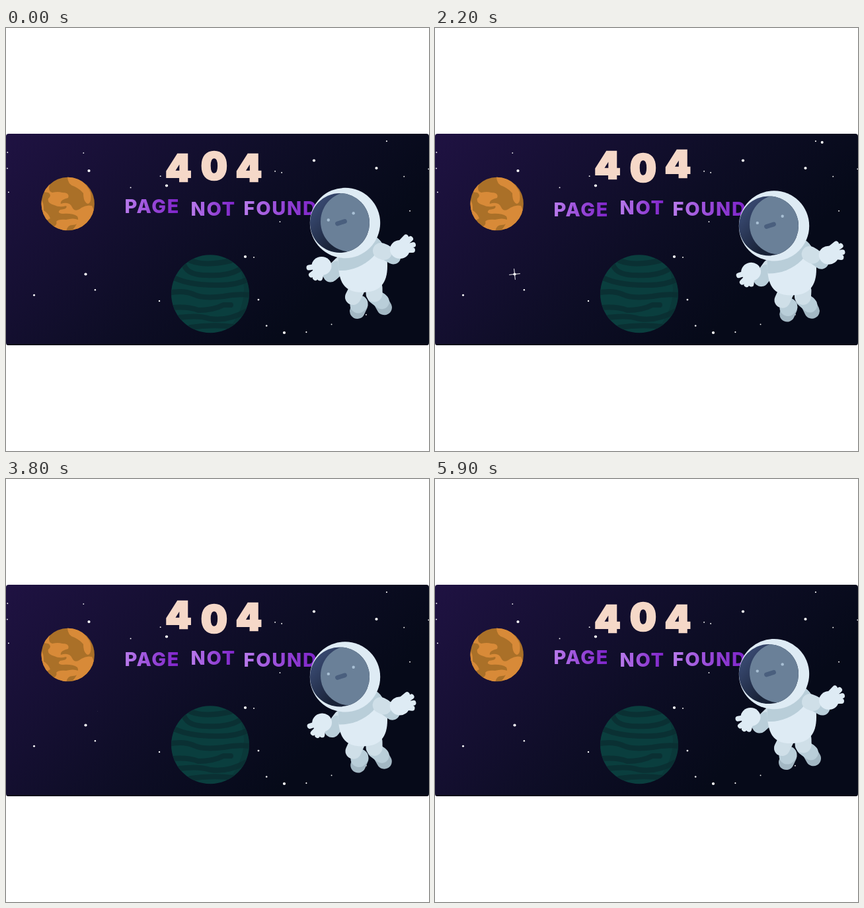
Recreate the animation shown at these times as an HTML page. Size 640 by 640 pixels, loop 6000 ms.

```html
<!DOCTYPE html>
<html lang="en">
<head>
<meta charset="utf-8">
<title>404</title>
<style>
html, body { margin: 0; width: 100%; height: 100%; overflow: hidden; background: #fff; }
svg { display: block; width: 100vw; height: 100vh; }
text { font-family: Inter, Roboto, sans-serif; }
.digit { font-size: 56px; font-weight: 900; fill: #f5d8c8; stroke: #f5d8c8; stroke-width: 2.6; text-anchor: middle; }
.word { font-size: 29px; font-weight: 800; letter-spacing: 1.7px; fill: url(#purple); }
.limb { fill: none; stroke-linecap: round; stroke-linejoin: round; }
</style>
</head>
<body>
<svg viewBox="0 0 640 640">
  <defs>
    <linearGradient id="sky" gradientUnits="userSpaceOnUse" x1="0" y1="160" x2="480" y2="640">
      <stop offset="0" stop-color="#1f1242"/>
      <stop offset=".5" stop-color="#0d0d25"/>
      <stop offset=".75" stop-color="#060a19"/>
    </linearGradient>
    <linearGradient id="purple">
      <stop offset="0" stop-color="#b97bec"/>
      <stop offset=".55" stop-color="#9444d6"/>
      <stop offset="1" stop-color="#7d22c8"/>
    </linearGradient>
    <linearGradient id="glass" x1="0" y1=".4" x2=".45" y2=".8">
      <stop offset="0" stop-color="#36466c"/>
      <stop offset="1" stop-color="#192338"/>
    </linearGradient>
    <clipPath id="panel"><rect y="160" width="640" height="320" rx="4"/></clipPath>
    <clipPath id="orange"><circle cx="93.7" cy="266" r="40.2"/></clipPath>
    <clipPath id="green"><circle cx="309" cy="402.3" r="59"/></clipPath>
    <clipPath id="visor"><circle cx="505" cy="295" r="45"/></clipPath>
    <path id="torso" d="M502 338 L503 362 C505 388 514 400 539 400 C566 400 577 386 577 360 C577 340 572 322 556 314 Z"/>
    <clipPath id="chest"><use href="#torso"/></clipPath>
  </defs>

  <g clip-path="url(#panel)">
    <rect y="160" width="640" height="320" fill="url(#sky)"/>
    <rect y="478" width="640" height="2" fill="#050417"/>
    <g id="stars" fill="#fff" stroke-linecap="round"></g>

    <g clip-path="url(#orange)">
      <rect x="50" y="220" width="90" height="90" fill="#aa7028"/>
      <g fill="#d88a38">
        <path d="M93 225 Q119 227 128 249 Q130 265 124 266 Q117 264 117 250 Q112 244 104 240 Q93 237 93 225Z"/>
        <path d="M67 233 Q62 247 70 249 Q79 247 85 249 Q97 249 94 257 Q81 260 83 266 Q96 262 100 271 Q104 280 114 272 Q122 267 130 269 L134 278 L122 302 L101 305 Q112 292 108 285 Q101 280 86 281 Q76 280 82 275 Q94 274 91 269 Q81 272 73 268 Q62 265 64 258 Q70 253 64 249 L56 248 Z"/>
        <path d="M52 257 Q58 266 57 276 Q64 280 67 288 L60 292 L50 275Z"/>
        <path d="M72 301 Q78 297 76 293 Q79 289 91 290 Q102 287 109 290 Q112 297 101 298 Q92 298 91 309Z"/>
      </g>
      <path d="M118 230 Q148 263 120 303 L140 300 L140 230Z" fill="#7a4e20" opacity=".35"/>
    </g>

    <g clip-path="url(#green)">
      <rect x="248" y="340" width="122" height="124" fill="#0a3e3e"/>
      <g class="limb" stroke="#0a3033" stroke-width="8">
        <path d="M279 352 Q302 361 340 352"/>
        <path d="M270 360 Q276 374 304 374 Q334 376 352 366"/>
        <path d="M252 377 Q276 389 316 389 Q348 390 366 380"/>
        <path d="M246 401 Q268 396 284 403 Q298 410 329 406 Q348 402 370 404"/>
        <path d="M252 423 Q276 421 291 427 Q314 427 329 419 L340 419"/>
        <path d="M262 438 Q292 434 309 440 Q336 444 364 428"/>
        <path d="M279 453 Q311 448 345 452"/>
      </g>
      <path d="M344 345 Q380 402 335 458 L372 460 L372 345Z" fill="#0a3033" opacity=".35"/>
    </g>

    <text class="digit" id="four1" x="261" y="232.500">4</text>
    <text class="digit" id="zero" x="315" y="228.500">0</text>
    <text class="digit" id="four2" x="367.500" y="232.500">4</text>
    <text class="word" id="page" x="179.500" y="280">PAGE</text>
    <text class="word" id="not" x="279.500" y="284.500">NOT</text>
    <text class="word" id="found" x="359.500" y="282.800">FOUND</text>

    <g id="body">
      <g id="legL" class="limb">
        <path d="M536 419 L531.500 428.500" stroke="#a3b8c4" stroke-width="23"/>
        <path d="M535 417 L533 419" stroke="#b9ced9" stroke-width="25"/>
        <path d="M532 393 L525 407" stroke="#cfdfe8" stroke-width="24"/>
      </g>
      <g id="legR" class="limb">
        <path d="M566 412 L572 423" stroke="#a3b8c4" stroke-width="23"/>
        <path d="M558 406 L568 414" stroke="#b9ced9" stroke-width="23"/>
        <path d="M557 393 L557 402" stroke="#cfdfe8" stroke-width="25"/>
      </g>
      <g id="armL" class="limb">
        <path d="M507 357 L501 363" stroke="#cfdfe8" stroke-width="23"/>
        <path d="M501 364 L491 373" stroke="#b9ced9" stroke-width="23"/>
        <g stroke="#deebf4" stroke-width="8">
          <ellipse cx="477.500" cy="360" rx="15" ry="14" fill="#deebf4" stroke="none"/>
          <path d="M474 360 L458.500 362.500 M476 363 L462 373.500 M477 364 L468 378 M479 364 L475 378.500"/>
        </g>
      </g>
      <use href="#torso" fill="#deebf4"/>
      <circle cx="506" cy="298" r="69" fill="#b9ced9" clip-path="url(#chest)"/>
      <g id="armR" class="limb">
        <path d="M586 346 L577 341" stroke="#b9ced9" stroke-width="23"/>
        <path d="M567 337 L572 339" stroke="#cfdfe8" stroke-width="24"/>
        <g stroke="#deebf4" stroke-width="8">
          <ellipse cx="596" cy="335" rx="15" ry="14" fill="#deebf4" stroke="none"/>
          <path d="M592 330 L605 316.500 M598 331 L612 319 M598 333 L616 328 M598 336 L615 336"/>
        </g>
      </g>
      <circle cx="513" cy="295" r="53.200" fill="#deebf4"/>
      <circle cx="505" cy="295" r="45" fill="url(#glass)"/>
      <circle cx="521.500" cy="293" r="45.500" fill="#6a8098" clip-path="url(#visor)"/>
      <g fill="#a8bfd4"><circle cx="487.800" cy="290.500" r="2.200"/><circle cx="525.700" cy="280.300" r="2.200"/></g>
      <path d="M501.500 296 L512.500 292.500" class="limb" stroke="#4a5f7e" stroke-width="6.800"/>
    </g>
  </g>
</svg>
<script>
const LOOP = 6000, STEP = 100;
const $ = id => document.getElementById(id);

function add(tag, attrs) {
  const el = document.createElementNS('http://www.w3.org/2000/svg', tag);
  for (const k in attrs) el.setAttribute(k, attrs[k]);
  return $('stars').appendChild(el);
}
const dot = (cx, cy, r) => add('circle', { cx, cy, r });

// A few bright stars at fixed places, the faint ones scattered
const bright = [[125.5, 216], [466, 200.5], [560.5, 212], [243, 238.5], [362, 346], [120.5, 372.5], [421, 461]];
for (const [x, y] of bright) dot(x, y, 2.1);

let seed = 404;
const random = () => (seed = seed * 16807 % 2147483647) / 2147483647;
for (let i = 0; i < 32; i++) dot(640 * random(), 170 + 300 * random(), .9 + .6 * random() ** 3);

const spark = (x, y, at, turn) => {
  const el = add('path', { d: 'M-8 0H8M0-8V8', stroke: '#fff', 'stroke-width': .9 });
  return (t, size) => el.setAttribute('transform',
    `translate(${x} ${y}) rotate(${turn + (t - at) * .15}) scale(${size})`);
};
const blink = (x, y) => {
  const el = dot(x, y, 2);
  return (t, size) => el.setAttribute('opacity', size);
};
const twinkles = [
  { at: 2200, show: spark(120.5, 372.5, 2200, -6) },
  { at: 2200, show: blink(585.7, 173) },
  { at: 2800, show: blink(141, 351.3) },
  { at: 5100, show: spark(466, 200.5, 5100, 42) }
];

// Smooth swing from 0 to 1 and back, highest at the given time
const wave = (t, peak, period = LOOP) => (1 + Math.cos((t - peak) / period * 2 * Math.PI)) / 2;
const shift = (id, y) => $(id).setAttribute('transform', `translate(0 ${y})`);
const rotate = (id, a, x, y) => $(id).setAttribute('transform', `rotate(${a} ${x} ${y})`);

function draw(t) {
  shift('four1', -7 * wave(t, 3400));
  shift('zero', 4.2 * wave(t, 2900));
  shift('four2', -6.4 * wave(t, 2350));
  shift('page', 5 * wave(t, 2450));
  shift('not', -3.5 * wave(t, 3200));

  const bob = wave(t, 1500, LOOP / 2);
  shift('found', 3 * bob);
  shift('body', 8 * bob);

  const reach = wave(t, 2950);
  rotate('armL', -10.2 * reach, 507, 358);
  rotate('armR', 8.4 * reach, 562, 335);

  const kick = bob ** 1.5;
  rotate('legL', 6 * wave(t, 3000) - 17 * kick, 533, 392);
  rotate('legR', 18 * kick - 8 * wave(t, 3600), 556, 392);

  for (const { at, show } of twinkles) show(t, Math.max(0, 1 - ((t - at) / 350) ** 2));
}

function tick(now) {
  draw(Math.floor(now % LOOP / STEP) * STEP);
  requestAnimationFrame(tick);
}
draw(0);
requestAnimationFrame(tick);
</script>
</body>
</html>
```
